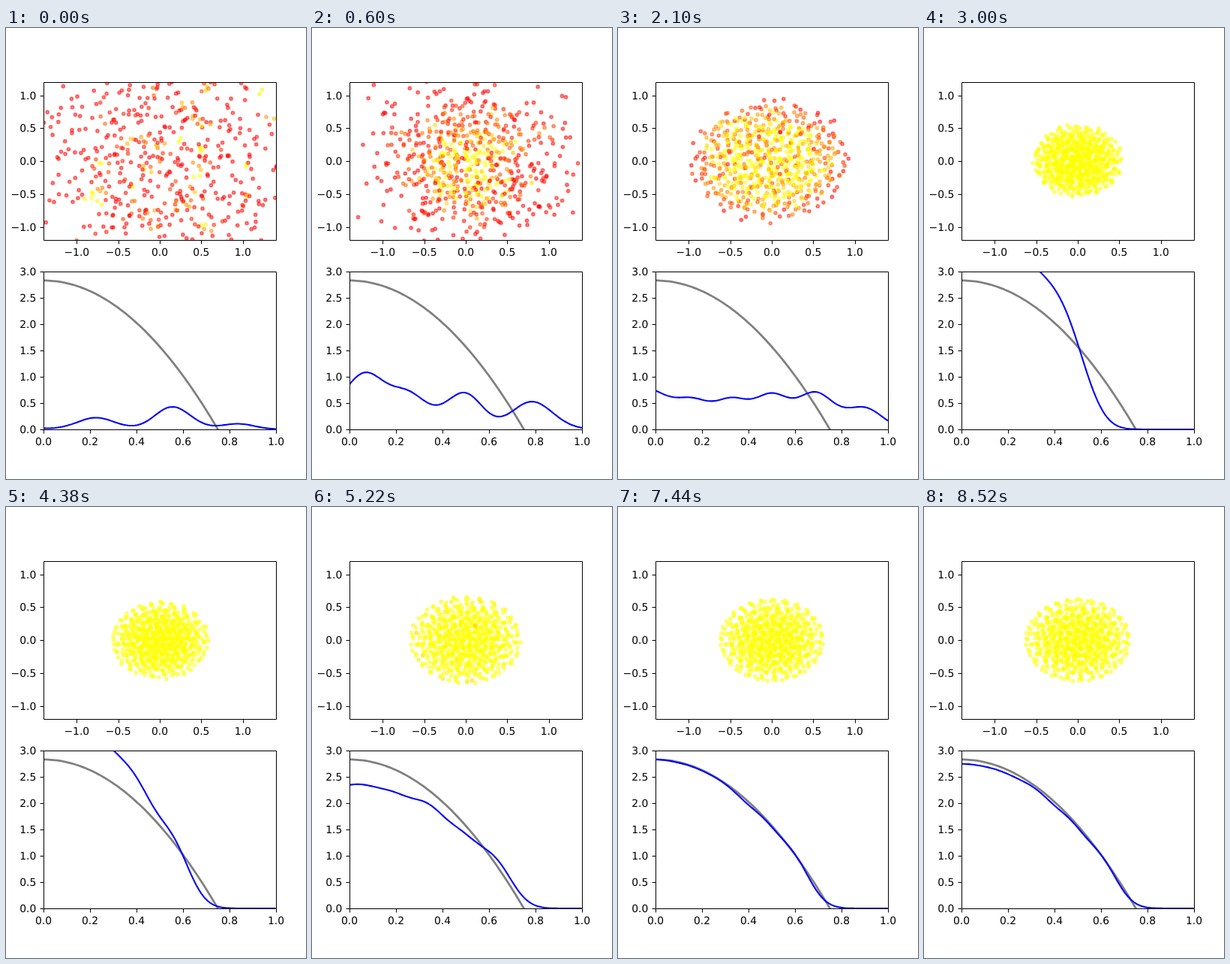
An HTML page with a canvas for the animation above (8.58 s loop, 400 by 600 pixels).

```html
<!DOCTYPE html>
<html lang="en">
<head>
<meta charset="utf-8">
<title>Star relaxation</title>
<style>
html, body { margin: 0; width: 100%; height: 100%; overflow: hidden; background: #fff; }
canvas, svg { position: absolute; left: 0; top: 0; width: 400px; height: 600px; }
text { font: 13.89px "DejaVu Sans", sans-serif; fill: #000; text-rendering: geometricPrecision; }
path { fill: none; stroke: #000; stroke-width: 1; }
</style>
</head>
<body>
<canvas id="plot" width="400" height="600"></canvas>
<svg id="axes" viewBox="0 0 400 600"></svg>
<script>
const FRAMES = 143, FRAME_MS = 60, LEFT = 50, WIDTH = 310, HEIGHT = 210;
const top1 = 72, top2 = 324;
const scale = (lo, hi, a, b) => v => a + (v - lo) / (hi - lo) * (b - a);
const starX = scale(-1.4, 1.4, LEFT, LEFT + WIDTH);
const starY = scale(-1.2, 1.2, top1 + HEIGHT, top1);
const radX = scale(0, 1, LEFT, LEFT + WIDTH);
const rhoY = scale(0, 3, top2 + HEIGHT, top2);

// Axes
const range = (lo, step, n) => Array.from({ length: n }, (_, i) => lo + i * step);
const label = v => v.toFixed(1).replace('-', '\u2212');
const snap = v => Math.floor(v + .5 + 1e-6) + .5;

function axes(top, sx, sy, xs, ys) {
  const base = top + HEIGHT;
  let lines = `M${LEFT + .5} ${top + .5}h${WIDTH}v${HEIGHT}h${-WIDTH}z`;
  let words = '';
  for (const v of xs) {
    lines += `M${snap(sx(v))} ${base + .5}v5`;
    words += `<text x="${sx(v)}" y="${base + 21}" text-anchor="middle">${label(v)}</text>`;
  }
  for (const v of ys) {
    lines += `M${LEFT + .5} ${snap(sy(v))}h-5`;
    words += `<text x="40.3" y="${Math.round(sy(v) + 5.2)}" text-anchor="end">${label(v)}</text>`;
  }
  return `<path d="${lines}"/>${words}`;
}
document.getElementById('axes').innerHTML =
  axes(top1, starX, starY, range(-1, .5, 5), range(-1, .5, 5)) +
  axes(top2, radX, rhoY, range(0, .2, 6), range(0, .5, 7));

// Mersenne Twister with polar normal deviates
function normals(seed) {
  const mt = new Uint32Array(624);
  mt[0] = seed;
  for (let i = 1; i < 624; i++) {
    mt[i] = Math.imul(1812433253, mt[i - 1] ^ (mt[i - 1] >>> 30)) + i;
  }
  let at = 624, spare = null;
  const word = () => {
    if (at === 624) {
      for (let i = 0; i < 624; i++) {
        const y = (mt[i] & 0x80000000) | (mt[(i + 1) % 624] & 0x7fffffff);
        mt[i] = mt[(i + 397) % 624] ^ (y >>> 1) ^ (y & 1 ? 0x9908b0df : 0);
      }
      at = 0;
    }
    let y = mt[at++];
    y ^= y >>> 11;
    y ^= (y << 7) & 0x9d2c5680;
    y ^= (y << 15) & 0xefc60000;
    return (y ^ (y >>> 18)) >>> 0;
  };
  const uniform = () => ((word() >>> 5) * 67108864 + (word() >>> 6)) / 9007199254740992;
  return () => {
    if (spare !== null) { const g = spare; spare = null; return g; }
    let a, b, s;
    do { a = 2 * uniform() - 1; b = 2 * uniform() - 1; s = a * a + b * b; } while (s >= 1 || s === 0);
    const f = Math.sqrt(-2 * Math.log(s) / s);
    spare = f * a;
    return f * b;
  };
}

// Smoothed-particle star: pressure k*rho^2, harmonic gravity, drag
const N = 700, MASS = 2, R = .75, H = .1, K = .1, DRAG = 1, DT = .07, LAMBDA = 2.012;
const m = MASS / N, H2 = H * H, CUT = 9 * H2;
const W0 = Math.pow(H * Math.sqrt(Math.PI), -3);
const PUSH = m * 2 * K * 2 * W0 / H2;

function simulate() {
  const gauss = normals(42);
  const pos = Float64Array.from({ length: 3 * N }, gauss);
  const vel = new Float64Array(3 * N), acc = new Float64Array(3 * N), rho = new Float64Array(N);
  const forces = () => {
    rho.fill(m * W0);
    for (let i = 0; i < 3 * N; i++) acc[i] = -LAMBDA * pos[i] - DRAG * vel[i];
    for (let i = 0; i < N; i++) {
      const a = 3 * i, x = pos[a], y = pos[a + 1], z = pos[a + 2];
      for (let j = i + 1; j < N; j++) {
        const b = 3 * j, dx = x - pos[b];
        let d2 = dx * dx;
        if (d2 > CUT) continue;
        const dy = y - pos[b + 1], dz = z - pos[b + 2];
        d2 += dy * dy + dz * dz;
        if (d2 > CUT) continue;
        const e = Math.exp(-d2 / H2), p = PUSH * e;
        rho[i] += m * W0 * e;
        rho[j] += m * W0 * e;
        acc[a] += p * dx; acc[a + 1] += p * dy; acc[a + 2] += p * dz;
        acc[b] -= p * dx; acc[b + 1] -= p * dy; acc[b + 2] -= p * dz;
      }
    }
  };
  const kick = () => { for (let i = 0; i < 3 * N; i++) vel[i] += acc[i] * DT / 2; };
  const drift = () => { for (let i = 0; i < 3 * N; i++) pos[i] += vel[i] * DT; };
  forces();
  return range(0, 1, FRAMES).map(() => {
    kick();
    drift();
    forces();
    kick();
    return { pos: Float32Array.from(pos), rho: Float32Array.from(rho) };
  });
}
const states = simulate();

// Density along the x axis
const radii = range(0, 1 / 99, 100);
function profile({ pos }) {
  const out = new Array(100).fill(0);
  for (let i = 0; i < 3 * N; i += 3) {
    const d = pos[i + 1] ** 2 + pos[i + 2] ** 2;
    if (d > CUT) continue;
    radii.forEach((r, n) => {
      const d2 = d + (pos[i] - r) ** 2;
      if (d2 < CUT) out[n] += m * W0 * Math.exp(-d2 / H2);
    });
  }
  return out;
}

// Drawing
const ctx = document.getElementById('plot').getContext('2d');
const analytic = radii.map(r => LAMBDA / (4 * K) * (R * R - r * r));
const heat = scale(m * W0 + .03, .8, 0, 255);

function clipped(top, draw) {
  ctx.save();
  ctx.beginPath();
  ctx.rect(LEFT, top, WIDTH, HEIGHT);
  ctx.clip();
  draw();
  ctx.restore();
}
function curve(values, color, width) {
  ctx.beginPath();
  values.forEach((v, n) => ctx.lineTo(radX(radii[n]), rhoY(v)));
  ctx.strokeStyle = color;
  ctx.lineWidth = width;
  ctx.lineJoin = 'round';
  ctx.stroke();
}
function dots({ pos, rho }) {
  ctx.globalAlpha = .5;
  ctx.lineWidth = 1.39;
  for (let i = 0; i < N; i++) {
    const green = Math.round(Math.min(255, Math.max(0, heat(rho[i]))));
    ctx.fillStyle = ctx.strokeStyle = `rgb(255,${green},0)`;
    ctx.beginPath();
    ctx.arc(starX(pos[3 * i]), starY(pos[3 * i + 1]), 2.2, 0, 7);
    ctx.fill();
    ctx.stroke();
  }
}
function draw(f) {
  ctx.fillStyle = '#fff';
  ctx.fillRect(0, 0, 400, 600);
  clipped(top1, () => dots(states[f]));
  clipped(top2, () => {
    curve(analytic, '#808080', 2.78);
    curve(profile(states[f]), '#00f', 2.08);
  });
}

const start = performance.now();
let shown = -1;
function tick() {
  const f = Math.floor((performance.now() - start) / FRAME_MS) % FRAMES;
  if (f !== shown) draw(shown = f);
  requestAnimationFrame(tick);
}
tick();
</script>
</body>
</html>
```
